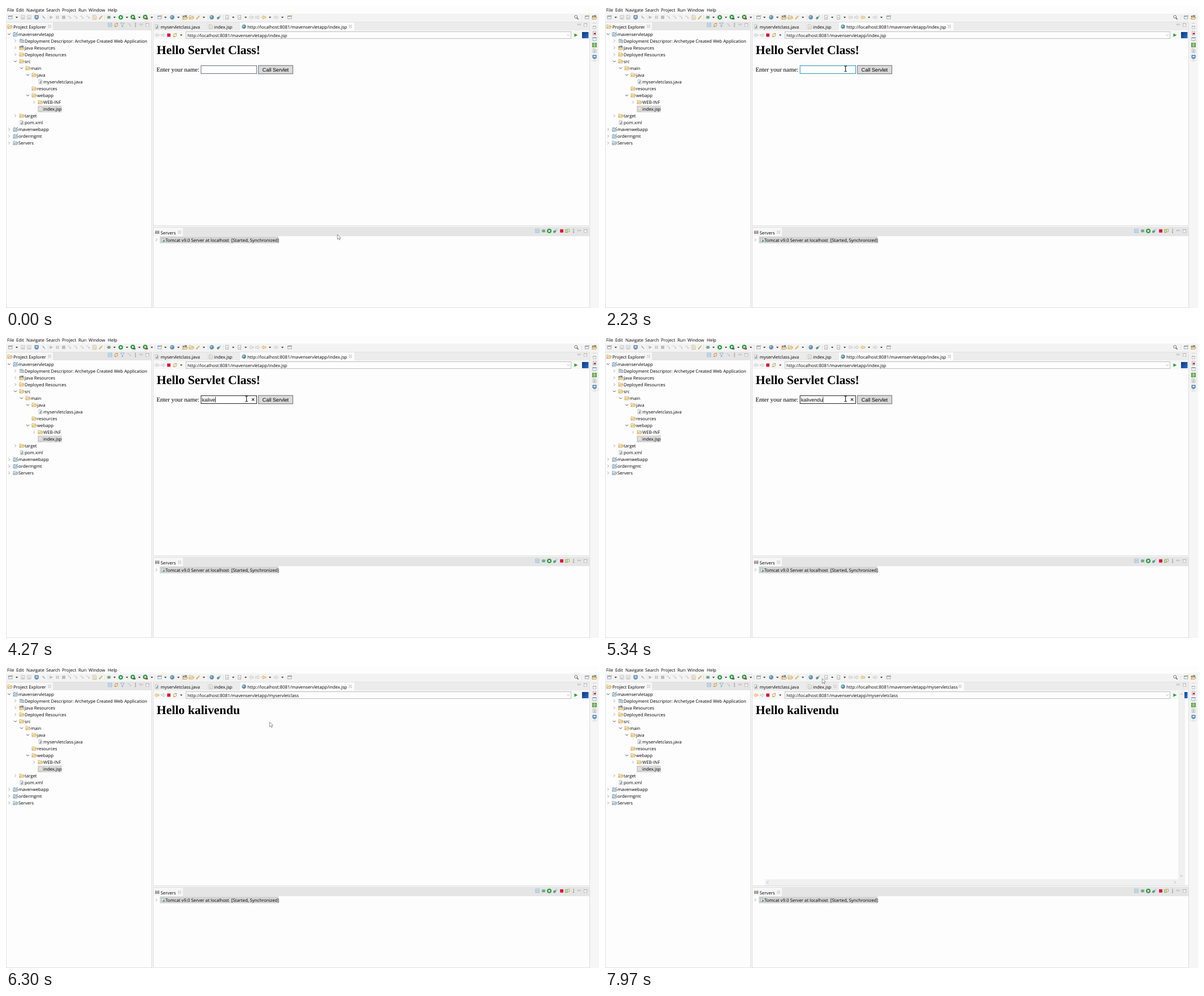
Recreate the animation shown at these times as an HTML page with a canvas. Size 1049 px wide and 534 px high, loop 8000 ms.

```html
<!DOCTYPE html>
<html lang="en">
<head>
<meta charset="utf-8">
<title>Servlet demo</title>
<style>
html, body { margin: 0; width: 100%; height: 100%; overflow: hidden; background: #fdfdfd; }
canvas { display: block; width: 1049px; height: 534px; }
</style>
</head>
<body>
<canvas id="stage" width="1049" height="534"></canvas>
<script>
const c = document.getElementById('stage').getContext('2d');
const LOOP = 8000;
const UI = '7.8px "Open Sans", "Noto Sans", sans-serif';
const ARIAL = '9.11px "Liberation Sans", Arial, sans-serif';
const SERIF = '10.93px "Liberation Serif", Times, serif';
const HEAD = 'bold 21.85px "Liberation Serif", Times, serif';
const PAPER = '#fdfdfd', BAR = '#e5e5e5', GOLD = '#cfa14a', BLUE = '#3f7fb5',
  GREEN = '#2f9e44', RED = '#d5163a', GREY = '#bcbcbc', DARK = '#666';
const USER = 'kalivendu';
const HOST = 'http://localhost:8081/mavenservletapp/';

const LOAD = 6060, RETITLE = 6700, HOVER = 2050, FOCUS = 2550;
const typedAt = i => i < 2 ? 3000 + i * 220 : 3480 + (i - 2) * 230;

// Cursor stops: time, x, y
const PATH = [[1200, 586, 404], [2120, 425.5, 111], [5430, 425.5, 111],
  [5880, 468, 110], [6060, 468, 110], [6260, 466, 99], [7050, 466, 99], [7960, 384, 22]];

function cursorAt(t) {
  const i = PATH.findIndex(p => p[0] > t);
  if (i === 0) return PATH[0].slice(1);
  if (i < 0) return PATH[PATH.length - 1].slice(1);
  const a = PATH[i - 1], b = PATH[i];
  const u = (t - a[0]) / (b[0] - a[0]), e = u * u * (3 - 2 * u);
  return [a[1] + (b[1] - a[1]) * e, a[2] + (b[2] - a[2]) * e];
}

function box(x, y, w, h, fill, edge, lw = 1) {
  if (fill) { c.fillStyle = fill; c.fillRect(x, y, w, h); }
  if (edge) {
    c.strokeStyle = edge; c.lineWidth = lw;
    c.strokeRect(x + lw / 2, y + lw / 2, w - lw, h - lw);
  }
}
function shape(x, y, pts, fill, edge, lw = 0.8, open) {
  c.beginPath();
  for (let i = 0; i < pts.length; i += 2) c.lineTo(x + pts[i], y + pts[i + 1]);
  if (!open) c.closePath();
  if (fill) { c.fillStyle = fill; c.fill(); }
  if (edge) { c.strokeStyle = edge; c.lineWidth = lw; c.stroke(); }
}
const line = (x, y, pts, col, lw) => shape(x, y, pts, null, col, lw, true);
function cross(x, y, r, col, lw) {
  line(x, y, [-r, -r, r, r], col, lw);
  line(x, y, [-r, r, r, -r], col, lw);
}
function disc(x, y, r, fill, edge) {
  c.beginPath(); c.arc(x, y, r, 0, 7);
  c.fillStyle = fill; c.fill();
  if (edge) { c.strokeStyle = edge; c.lineWidth = 0.8; c.stroke(); }
}
function text(s, x, y, font = UI, col = '#000') {
  c.font = font; c.fillStyle = col; c.fillText(s, x, y);
}
const label = (s, x, mid) => text(s, x, mid + 3.2);
const chevron = (x, y, dx, dy, s, col) => line(x, y,
  dx ? [-dx * s / 2, -s, dx * s / 2, 0, -dx * s / 2, s] : [-s, -dy * s / 2, 0, dy * s / 2, s, -dy * s / 2], col, 0.9);

const icon = {
  drop: (x, y) => shape(x, y, [-2.1, -1, 2.1, -1, 0, 1.4], '#333'),
  doc(x, y, col = GOLD) {
    box(x - 3, y - 3.7, 6, 7.5, '#f8f8f8', '#a3a9ad', 0.8);
    box(x - 1.2, y - 0.6, 3.4, 2.8, col);
  },
  file(x, y, col = '#a5acb4') {
    shape(x, y, [-2.8, -3.7, 1.2, -3.7, 3, -2, 3, 3.7, -2.8, 3.7], '#fbfaf5', '#b5ae9c', 0.8);
    for (const d of [-1.4, 0.5, 2.2]) line(x, y + d, [-1.4, 0, 1.6, 0], col, 0.7);
  },
  java(x, y) {
    icon.file(x, y, '#d5d9de');
    line(x, y, [0.8, -2, 0.8, 1.6, -0.2, 2.3, -1.4, 1.6], '#3b6b9b', 1.1);
  },
  window(x, y) {
    box(x - 3.8, y - 2.8, 7, 6, '#f7fafc', '#8297a8', 0.8);
    box(x - 3.8, y - 2.8, 7, 1.6, '#7896b2');
    disc(x + 2.8, y - 2.6, 1.3, '#e2bd5c');
  },
  folder(x, y, fill = '#f8e5b1', edge = '#c29a4c') {
    shape(x, y, [-4, 3, -4, -3, -1, -3, 0, -2, 3, -2, 3, 0], '#fcf5e0', edge, 0.8);
    shape(x, y, [-4, 3, -2.2, 0, 4.4, 0, 2.7, 3], fill, edge, 0.8);
  },
  blueFolder: (x, y) => icon.folder(x, y, '#c9dcec', '#6f91ad'),
  library(x, y) {
    icon.folder(x, y + 0.5);
    box(x - 1, y - 3.6, 4, 3, '#5e83ad');
    box(x - 3.8, y - 3, 2, 3, '#a26b4c');
  },
  deploy(x, y) {
    box(x - 3.8, y - 3.4, 3, 6.6, '#e4e9ed', '#8c9ba6', 0.8);
    box(x, y - 1.5, 4, 4.8, '#d5e1ea', '#7590a5', 0.8);
    line(x, y, [-2.4, -1.5, 2.2, -3.2], '#6d9b74', 0.9);
  },
  project(x, y) {
    icon.blueFolder(x, y + 0.6);
    box(x - 3.2, y - 3.4, 3, 2.2, '#8bacc9');
    line(x, y, [1.2, -1.5, 3.8, -3.8], '#566f88', 1);
  },
  save(x, y) {
    box(x - 3.5, y - 3.5, 7, 7, '#ececec', GREY, 0.8);
    box(x - 1.5, y + 0.3, 3, 2.7, '#c9c9c9');
  },
  screen(x, y) {
    box(x - 3.3, y - 3.4, 6.8, 5.6, '#c4d9ee', '#32619a', 1.1);
    line(x, y, [-2, 3.2, 2.2, 3.2], '#32619a', 1);
  },
  wand: (x, y) => { line(x, y, [-2.3, -2.8, 2.3, 2.8], '#738293', 0.9); disc(x - 0.8, y, 1, '#86a0bb'); },
  play: (x, y, col = GREEN) => shape(x, y, [-2.6, -3, 3.4, 0, -2.6, 3], col),
  pause: (x, y) => { box(x - 2.3, y - 2.8, 1.7, 5.6, GREY); box(x + 0.7, y - 2.8, 1.7, 5.6, GREY); },
  stop: (x, y, col = GREY) => box(x - 2.9, y - 2.9, 5.8, 5.8, col),
  step(x, y) {
    line(x, y, [-3, -2, 0, -2, 2, 1], GREY, 0.9);
    shape(x, y, [0.5, 0.5, 3.5, 0.5, 2, 3], GREY);
  },
  bug(x, y) {
    cross(x, y, 2.9, '#5c8068', 0.7);
    line(x, y, [-3.8, 0, 3.8, 0], '#5c8068', 0.7);
    disc(x, y, 2, '#84bb92', '#35764f');
  },
  run(x, y) {
    disc(x, y, 3.6, '#2fa443', '#1d8032');
    shape(x, y, [-1.2, -2.2, 2.4, 0, -1.2, 2.2], '#fff');
  },
  runBox(x, y, col = '#b9424a') {
    icon.run(x - 0.7, y - 0.6);
    box(x, y + 1, 4, 2.8, col);
  },
  globe(x, y) {
    disc(x, y, 3.4, '#5e95b8', '#6b7f8f');
    disc(x - 1, y - 1, 1.5, '#b4d3cf');
  },
  pencil(x, y) {
    line(x, y, [-2.8, 2.8, 2.3, -2.6], '#e0b458', 2);
    line(x, y, [-3.3, 3.3, -1.8, 1.8], '#7d6b47', 0.9);
  },
  profile(x, y) {
    line(x, y, [-3, 3, 2.6, -2.8], '#4f83b4', 2);
    disc(x - 1.7, y + 1.3, 1.7, '#72ab85', '#487c62');
    disc(x + 1.6, y - 1.6, 1.2, '#dbe8f3');
  },
  sync(x, y) {
    box(x - 3.8, y - 2.5, 4.3, 5.6, '#d6e4c8', '#6b9b4b', 0.8);
    box(x - 0.4, y - 3.3, 4.3, 5, '#f4ecc3', '#92a249', 0.8);
  },
  back: (x, y, col = GOLD) => shape(x, y,
    [-3.8, 0, -0.5, -2.9, -0.5, -1.2, 3.6, -1.2, 3.6, 1.2, -0.5, 1.2, -0.5, 2.9], col === GOLD ? '#fdeab4' : '#f4f4f4', col),
  next: (x, y, col = GREY) => shape(x, y,
    [3.8, 0, 0.5, -2.9, 0.5, -1.2, -3.6, -1.2, -3.6, 1.2, 0.5, 1.2, 0.5, 2.9], '#f4f4f4', col),
  refresh(x, y) {
    line(x, y, [-3, 0.5, -1, -2.5, 2.3, -2.5], GOLD, 1.2);
    line(x, y, [3, -0.5, 1, 2.5, -2.3, 2.5], GOLD, 1.2);
    shape(x, y, [1, -3.8, 3.6, -2.5, 1, -1.1], '#b98e3c');
    shape(x, y, [-1, 3.8, -3.6, 2.5, -1, 1.1], '#b98e3c');
  },
  minus(x, y) {
    box(x - 3.4, y - 3.4, 6.8, 6.8, '#eff6fb', '#6a9dc4', 0.8);
    line(x, y, [-1.8, 0, 1.8, 0], '#3f6c96', 0.9);
  },
  funnel: (x, y) => shape(x, y, [-3.3, -3.3, 3.3, -3.3, 0.7, 0, 0.7, 2.8, -0.7, 3.7, -0.7, 0], '#eaf2f8', '#7797b3', 0.7),
  dots: (x, y) => { for (const d of [-2.7, 0, 2.7]) disc(x, y + d, 0.8, DARK); },
  min: (x, y) => box(x - 2.8, y - 2, 5.6, 2.2, '#fff', '#a2a2a2', 0.7),
  max(x, y) {
    box(x - 2.8, y - 2.8, 5.8, 5.6, '#fff', '#a2a2a2', 0.7);
    line(x, y, [-2.8, -1.8, 3, -1.8], '#a2a2a2', 0.7);
  },
  close(x, y) {
    cross(x, y, 2.5, '#c6c6c6', 2);
    cross(x, y, 2.2, '#fafafa', 0.8);
  },
  table(x, y) {
    box(x - 3.4, y - 3.4, 6.8, 6.8, '#fff', '#8196a8', 0.8);
    box(x - 3.4, y - 3.4, 6.8, 1.8, '#8da5b8');
    line(x, y, [0, -1.6, 0, 3], '#b6c2cc', 0.7);
  },
  find(x, y) {
    disc(x - 0.8, y - 0.9, 2.4, '#fff', '#444');
    line(x, y, [1, 1, 3.5, 3.6], '#444', 1.2);
  },
  people(x, y) {
    for (const [d, col] of [[-2.4, '#7a5c84'], [0.2, '#a8754f'], [2.7, '#577b91']]) {
      disc(x + d, y - 1.8, 1, col);
      box(x + d - 0.9, y - 0.6, 1.8, 3.4, col);
    }
  },
  server(x, y) {
    box(x - 2.6, y - 3.8, 3.8, 7.4, '#eef2f4', '#8b9da9', 0.8);
    shape(x, y, [0, 0, 3.8, 1.9, 0, 3.8], GREEN);
  }
};
const put = (list, y) => list.forEach(([k, x, col]) => icon[k](x, y, col));

const TOOLS = [['window', 8], ['drop', 19], ['save', 30], ['save', 41], ['screen', 54], ['wand', 67],
  ['play', 80, GREY], ['pause', 91], ['stop', 102], ['step', 112], ['step', 123], ['step', 134], ['step', 145],
  ['file', 157, GOLD], ['pencil', 168], ['bug', 182], ['drop', 192], ['run', 203], ['drop', 214],
  ['runBox', 225, '#566b4f'], ['drop', 236], ['runBox', 247], ['drop', 258], ['window', 272], ['drop', 282],
  ['globe', 294], ['drop', 305], ['library', 317], ['folder', 328], ['pencil', 340], ['drop', 350],
  ['globe', 364], ['profile', 377], ['doc', 391, '#d5d5d5'], ['drop', 402], ['doc', 413, '#d5d5d5'],
  ['drop', 424], ['back', 434, GREY], ['next', 445], ['back', 456], ['drop', 467], ['next', 478],
  ['drop', 489], ['window', 502], ['find', 1009], ['window', 1028], ['library', 1041]];
const MENU = { File: 2, Edit: 18, Navigate: 36, Search: 71, Project: 99, Run: 128, Window: 146, Help: 180 };

// Depth, twisty (open, shut or none), icon, name
const TREE = [
  [0, 'v', 'project', 'mavenservletapp'],
  [1, '>', 'deploy', 'Deployment Descriptor: Archetype Created Web Application'],
  [1, '>', 'library', 'Java Resources'],
  [1, '>', 'folder', 'Deployed Resources'],
  [1, 'v', 'folder', 'src'],
  [2, 'v', 'folder', 'main'],
  [3, 'v', 'folder', 'java'],
  [4, '', 'java', 'myservletclass.java'],
  [3, '', 'folder', 'resources'],
  [3, 'v', 'folder', 'webapp'],
  [4, '>', 'folder', 'WEB-INF'],
  [4, '', 'file', 'index.jsp'],
  [1, '>', 'folder', 'target'],
  [1, '', 'java', 'pom.xml'],
  [0, '>', 'project', 'mavenwebapp'],
  [0, '>', 'project', 'ordermgmt'],
  [0, '>', 'blueFolder', 'Servers']
];

function frameUi() {
  box(0, 0, 1049, 534, '#f3f3f3');
  box(0, 0, 1049, 13.5, PAPER);
  for (const m in MENU) label(m, MENU[m], 7);
  put(TOOLS, 20);
  for (const x of [74, 152, 174, 263, 311, 357, 384, 1018]) box(x, 16, 0.7, 9, '#dadada');

  box(0, 28, 258, 506, PAPER, '#e0e0e0');
  box(1, 29, 256, 14, BAR);
  box(1, 29, 82, 14, '#f7f7f7');
  icon.folder(7, 36.5);
  label('Project Explorer', 13, 36.7);
  icon.close(77, 36);
  put([['minus', 184], ['refresh', 195], ['funnel', 206], ['step', 218], ['dots', 229], ['min', 239], ['max', 250]], 33.5);
}

function tree() {
  TREE.forEach(([depth, twist, kind, name], i) => {
    const x = 22 + depth * 11, y = 49.7 + i * 12.03;
    if (name === 'index.jsp') box(56, y - 6, 43, 12, '#d9d9d9');
    if (twist === 'v') chevron(x - 16.5, y, 0, 1, 2.4, '#333');
    if (twist === '>') chevron(x - 16.5, y, 1, 0, 2.4, '#999');
    icon[kind](x - 5, y);
    label(name, x, y);
  });
}

function servers() {
  box(260, 391, 773, 143, PAPER, '#e0e0e0');
  box(261, 392, 771, 15, BAR);
  box(261, 392, 52, 15, '#f7f7f7');
  icon.people(267.5, 400);
  label('Servers', 273.5, 400.6);
  icon.close(307, 400);
  put([['minus', 940], ['bug', 951], ['run', 961], ['profile', 972], ['stop', 983, RED],
    ['sync', 993], ['dots', 1004], ['min', 1014], ['max', 1025]], 397.7);
  box(272, 407.5, 210, 12, '#d4d4d4');
  chevron(266, 413.5, 1, 0, 2.4, '#999');
  icon.server(278, 413.5);
  label('Tomcat v9.0 Server at localhost  [Started, Synchronized]', 282, 413.7);
}

function trim() {
  box(1034, 28, 15, 506, '#f6f6f6');
  box(1035.5, 29, 11.5, 68, null, '#e4e4e4', 0.8);
  for (const y of [31, 97]) line(1038, y, [0, 0, 6, 0], '#c5c5c5', 0.8);
  icon.max(1041, 38);
  icon.doc(1041, 48, RED);
  icon.table(1041, 58.5);
  box(1037, 65, 8, 8, '#7db565', '#4c8b40', 0.8);
  line(1041, 69, [0, -3.5, 0, 3.5], '#e9f4e4', 0.8);
  icon.file(1041, 79, BLUE);
  icon.screen(1041, 90);
}

function editor(t) {
  const loaded = t >= LOAD, retitled = t >= RETITLE;
  const address = HOST + (loaded ? 'myservletclass' : 'index.jsp');
  const tabEnd = retitled ? 635 : 616;
  box(260, 28, 773, 361, PAPER, '#e0e0e0');
  box(261, 29, 771, 14.5, '#ececec');
  box(414, 29, tabEnd - 414, 14.5, PAPER);
  box(355, 30, 0.7, 12, '#ddd');
  icon.java(267, 36.5);
  label('myservletclass.java', 273.5, 36.7);
  icon.file(362, 36.5);
  label('index.jsp', 368, 36.7);
  if (t > 7740) icon.close(407, 36);
  icon.globe(421, 36.5);
  label(retitled ? address : HOST + 'index.jsp', 427, 36.7);
  icon.close(tabEnd - 7, 36);
  put([['min', 1014], ['max', 1025]], 33.5);

  box(261, 43.5, 771, 15, '#f7f7f7');
  icon.back(267, 51.5, loaded ? GOLD : GREY);
  put([['next', 278], ['stop', 288, RED], ['refresh', 299], ['drop', 310]], 51.5);
  box(318, 45, 682, 13, PAPER, '#b8b8b8', 0.9);
  label(address, 321, 51.7);
  chevron(994.5, 51.5, 0, 1, 2, '#aaa');
  icon.play(1008, 51.5);

  const sky = c.createLinearGradient(1019, 46, 1031, 57);
  sky.addColorStop(0, '#10357c');
  sky.addColorStop(1, '#2b6fc4');
  if (retitled) scrollbars();
  box(retitled ? 1025 : 1019, 46, retitled ? 5.5 : 11.5, 11, sky);
  page(t, loaded);
}

function scrollbars() {
  const col = '#aaa';
  box(1014, 44, 12, 333, '#f0f0f0');
  box(283, 377, 743, 11, '#f0f0f0');
  box(1026, 44, 6, 344, PAPER);
  chevron(1019.5, 50, 0, -1, 2.3, col);
  chevron(1019.5, 371, 0, 1, 2.3, col);
  chevron(288, 382.5, -1, 0, 2.3, col);
  chevron(1008, 382.5, 1, 0, 2.3, col);
}

function page(t, loaded) {
  text(loaded ? 'Hello ' + USER : 'Hello Servlet Class!', 266.5, 84.8, HEAD);
  if (loaded) return;
  text('Enter your name:', 266.2, 115.8, SERIF);
  let n = 0;
  while (n < USER.length && t >= typedAt(n)) n++;
  const typed = USER.slice(0, n);
  const edge = n ? '#333' : t >= HOVER ? '#3c9cbf' : '#737880';
  box(344.5, 105, 99.5, 15, '#fff', edge, 1.1);
  text(typed, 346.8, 115.7, ARIAL);
  if (n) cross(437, 112.3, 2.2, '#333', 1.1);
  const blink = t - (n ? typedAt(n - 1) : FOCUS);
  if (blink >= 0 && blink % 1060 < 530) {
    c.font = ARIAL;
    box(347 + c.measureText(typed).width, 107.5, 0.8, 10, '#111');
  }
  box(446, 104.7, 62, 15.6, '#dadada', '#777c82', 1.1);
  text('Call Servlet', 453.6, 115.7, ARIAL);
}

function cursor(t) {
  const [x, y] = cursorAt(t);
  const beam = t < LOAD && x > 344 && x < 444 && y > 104 && y < 120;
  if (beam) {
    line(x, y, [-2.3, -4.6, 2.3, -4.6], '#222', 1);
    line(x, y, [0, -4.6, 0, 4.6], '#222', 1.2);
    line(x, y, [-2.3, 4.6, 2.3, 4.6], '#222', 1);
  } else {
    shape(x + 0.3, y, [0, 0, 0, 8.6, 2, 6.9, 3.4, 9.7, 4.7, 9.1, 3.4, 6.3, 6, 6.2], '#fff', '#777', 0.8);
  }
}

function draw(t) {
  c.textRendering = 'geometricPrecision';
  c.textBaseline = 'alphabetic';
  frameUi();
  tree();
  editor(t);
  servers();
  trim();
  cursor(t);
}

const start = performance.now();
function tick(now) {
  draw(Math.max(0, now - start) % LOOP);
  requestAnimationFrame(tick);
}
draw(0);
requestAnimationFrame(tick);
</script>
</body>
</html>
```
